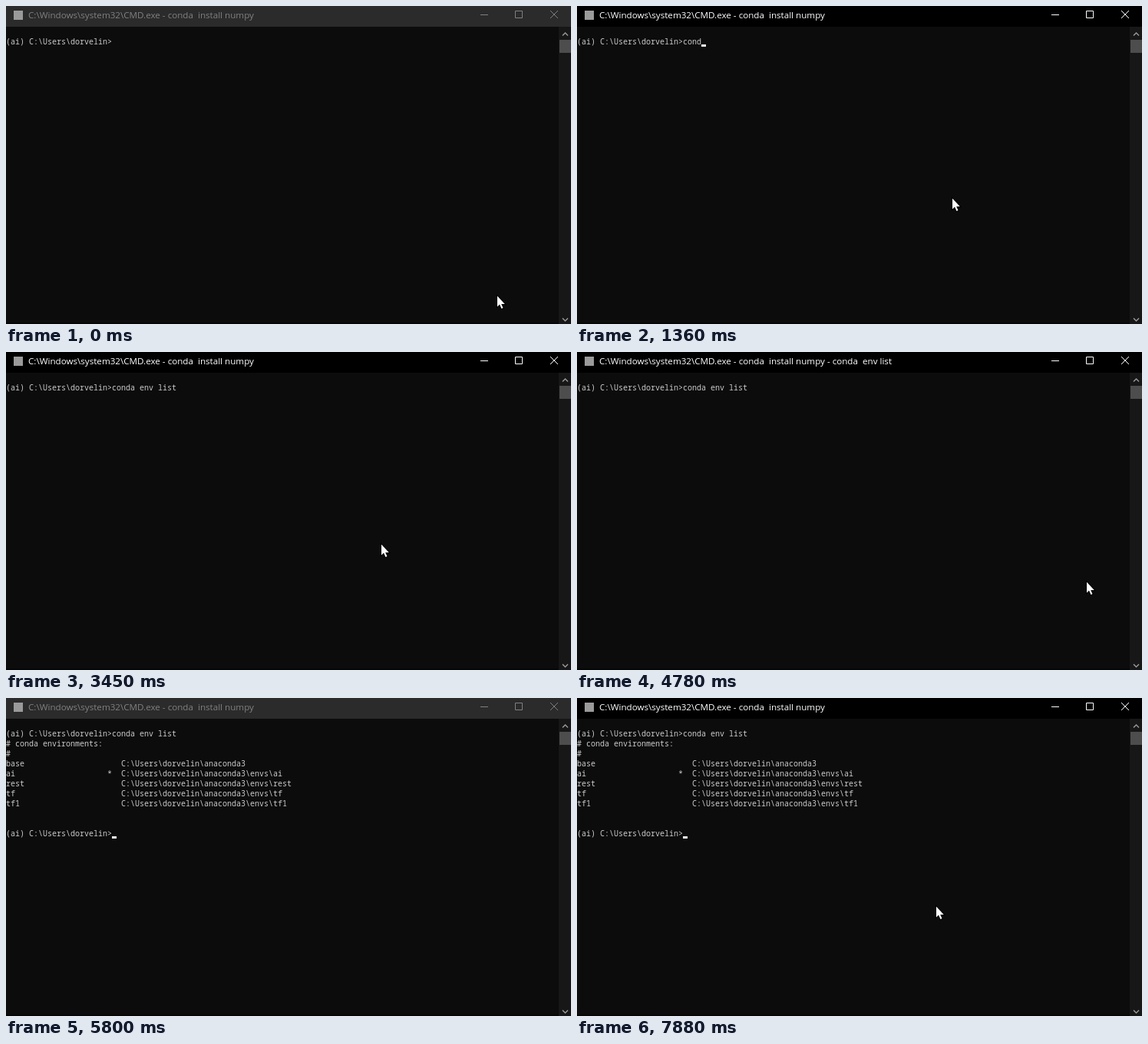
These frames come from a looping animation (736x414 px, 8 s). An HTML page:

```html
<!DOCTYPE html>
<html lang="en">
<head>
<meta charset="utf-8">
<title>Console</title>
<style>
  html, body { margin: 0; width: 100%; height: 100%; overflow: hidden; background: #0c0c0c; }
  svg { display: block; width: 736px; height: 414px; }
  text { white-space: pre; }
  #title { font: 11.64px "Open Sans", sans-serif; }
  .console text { font: 10px "Noto Sans Mono", monospace; fill: #ccc; }
  .bar { fill: #000; }
  .chrome { fill: #fff; --line: #fff; }
  .glyph { fill: none; stroke: var(--line); }
  .inactive .bar { fill: #2b2b2b; }
  .inactive .chrome { fill: #808080; --line: #808080; }
  .arrow { fill: none; stroke: #9a9a9a; stroke-width: 1.4; }
</style>
</head>
<body>
<svg id="stage" viewBox="0 0 736 414">
  <rect width="736" height="414" fill="#0c0c0c"/>
  <rect y="412" width="720" height="2" fill="#060606"/>
  <rect class="bar" width="736" height="27"/>
  <rect x="10" y="6" width="12" height="12" fill="#9a9a9a"/>
  <g class="chrome">
    <text id="title" x="29" y="16"></text>
    <path class="glyph" d="M618 11.5h10M663.5 6.5h9v9h-9z"/>
    <path class="glyph" d="M709 6l10 10m0-10l-10 10"/>
  </g>
  <rect x="720" y="27" width="16" height="387" fill="#171717"/>
  <rect x="721" y="44" width="15" height="17" fill="#4d4d4d"/>
  <path class="arrow" d="M725 38.5l3.5-3.5 3.5 3.5M725 406.5l3.5 3.5 3.5-3.5"/>
  <g class="console">
    <text id="command" y="50"></text>
    <g id="output"></g>
    <text id="nextPrompt" y="180"></text>
    <rect id="caret" width="6" height="3" fill="#f2f2f2"/>
  </g>
  <g id="mouse">
    <circle id="click" r="12" fill="#ff0" opacity=".5"/>
    <path d="M1 1.5V15.5L4 12.6 6.5 18l2-1-2.3-5h4.6z" fill="#fff" stroke="#000" stroke-width="2" paint-order="stroke"/>
  </g>
</svg>
<script>
const LOOP = 8000, CELL = 6, ROW = 13;
const FOCUS = 290, FIRST_KEY = 900, KEY_GAP = 128, ENTER = 4230, PRINT = 5630, BLUR = 5800, REFOCUS = 6870;
const $ = id => document.getElementById(id);
const home = "C:\\Users\\dorvelin";
const prompt = `(ai) ${home}>`;
const command = "conda env list";
const baseTitle = "C:\\Windows\\system32\\CMD.exe - conda  install numpy";

const envLine = (name, mark = " ") =>
  name.padEnd(22) + mark + "  " + home + "\\anaconda3" + (name === "base" ? "" : "\\envs\\" + name);
const output = ["# conda environments:", "#", envLine("base"), envLine("ai", "*"),
  envLine("rest"), envLine("tf"), envLine("tf1")];

output.forEach((line, i) => {
  const row = document.createElementNS("http://www.w3.org/2000/svg", "text");
  row.setAttribute("y", 50 + ROW * (i + 1));
  row.textContent = line;
  $("output").append(row);
});
$("nextPrompt").textContent = prompt;

// Pointer waypoints; y = 414 is just below the stage
const waypoints = [
  { time: 0, x: 639, y: 376 }, { time: FOCUS, x: 490, y: 248 },
  { time: 440, x: 488, y: 249 }, { time: 4710, x: 488, y: 249 },
  { time: 4780, x: 663, y: 298 }, { time: 5100, x: 711, y: 414 },
  { time: 6490, x: 540, y: 414 }, { time: REFOCUS, x: 438, y: 267 },
  { time: 7100, x: 467, y: 270 }
];

const within = (t, from, to) => t >= from && t < to;
const show = (id, on) => $(id).setAttribute("visibility", on ? "inherit" : "hidden");
const move = (id, x, y) => $(id).setAttribute("transform", `translate(${x} ${y})`);

function pointer(t) {
  const HOP = 73;
  const i = waypoints.findLastIndex(point => point.time <= t);
  const a = waypoints[i], b = waypoints[i + 1] ?? a;
  const hopped = Math.floor((t - a.time) / HOP) * HOP;
  const p = hopped / (b.time - a.time || 1);
  const eased = b === a ? 0 : p * (2 - p);
  return [a.x + (b.x - a.x) * eased, a.y + (b.y - a.y) * eased].map(Math.round);
}

// The caret lights up when it moves and then toggles on a steady clock
function caretLit(t) {
  const ticks = time => Math.floor((time - 140) / 552);
  const since = t < ENTER ? 2670 : t < PRINT ? ENTER : REFOCUS;
  return t >= 830 && (t < since || (ticks(t) - ticks(since)) % 2 === 0);
}

function draw(now) {
  const t = now % LOOP;
  const typed = Math.min(command.length, Math.max(0, Math.floor((t - FIRST_KEY) / KEY_GAP) + 1));
  const line = prompt + command.slice(0, typed);
  $("stage").classList.toggle("inactive", t < FOCUS || within(t, BLUR, REFOCUS));
  $("title").textContent = baseTitle + (within(t, ENTER, PRINT) ? " - conda  env list" : "");
  $("command").textContent = line;
  show("output", t >= PRINT);
  show("nextPrompt", t >= PRINT);

  const [column, row] = t < ENTER ? [line.length, 0] : t < PRINT ? [0, 1] : [prompt.length, 10];
  move("caret", column * CELL, 50 + ROW * row);
  show("caret", caretLit(t));
  move("mouse", ...pointer(t));
  show("click", within(t, FOCUS, 440) || within(t, REFOCUS, 6950));
  requestAnimationFrame(draw);
}
requestAnimationFrame(draw);
</script>
</body>
</html>
```
